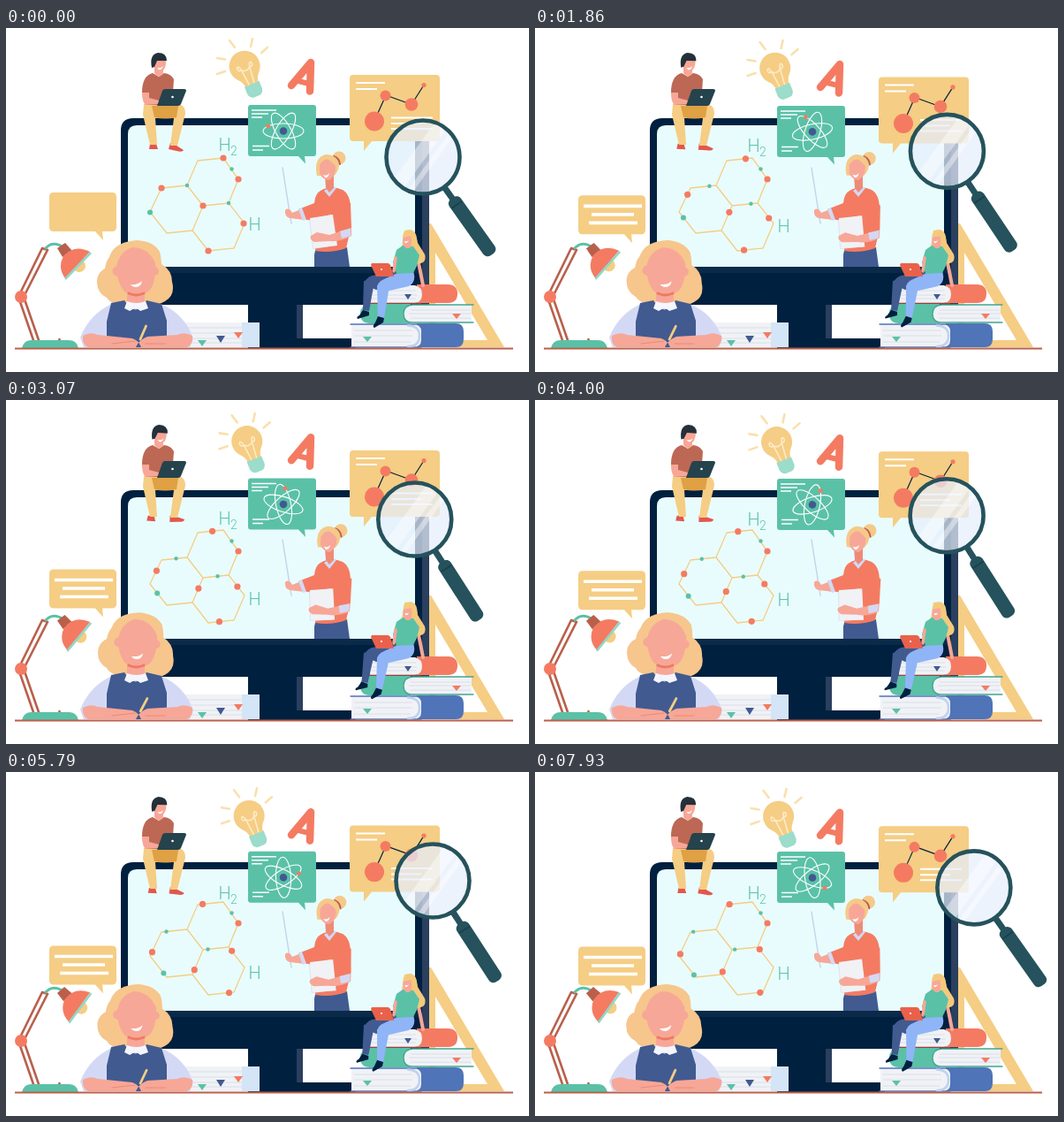
Write an HTML page that moves like this. It is 592 px wide and 389 px high and loops after 8 s.

```html
<!DOCTYPE html>
<html lang="en">
<head>
<meta charset="utf-8">
<title>Online lesson</title>
<style>
  html, body { margin: 0; width: 100%; height: 100%; overflow: hidden; background: #fff; }
  svg { display: block; width: 100%; height: 100%; }
  text { font: 300 20px Roboto, Inter, sans-serif; fill: #5ac1a7; }
  .orange { fill: #f47b62; } .yellow { fill: #f5cd84; } .mint { fill: #5ac1a7; }
  .navy { fill: #00203f; } .blue { fill: #415a90; } .skin { fill: #f7a797; }
  .lilac { fill: #d3d9f5; } .brown { fill: #b9604c; } .white { fill: #fff; }
  .page { fill: #f0f2f6; } .teal { fill: #25525c; }
  .line { fill: none; stroke-linecap: round; stroke-linejoin: round; }
  .rule { fill: none; stroke: #fff; }
  .pageRule { fill: none; stroke: #d9dfe8; stroke-width: 1; }
</style>
</head>
<body>
<svg viewBox="0 0 592 389" preserveAspectRatio="none">
  <defs><clipPath id="lensClip"><circle r="40"/></clipPath></defs>

  <!-- set square and monitor -->
  <path class="yellow" fill-rule="evenodd" d="M479 221H481L564 361H479ZM486 254V353H545Z"/>
  <path fill="#2b3f5e" d="M455 102H466Q479 102 479 115V313H455ZM325 313H336V352H325Z"/>
  <path class="navy" d="M144 102H458Q471 102 471 115V313H144Q130 313 130 299V116Q130 102 144 102ZM274 313H329V351H396V362H274Z"/>
  <path fill="#e8fcfd" d="M148 110H454Q463 110 463 119V270H138V120Q138 110 148 110Z"/>
  <path fill="#0b2a49" d="M138 270H463L471 277H130Z"/>

  <!-- molecule -->
  <path class="line" stroke="#f5cd84" stroke-width="1.3" d="M205 178L217 150 246 147 263 171 252 198 223 201ZL176 181 163 208 182 232 211 229 223 201M252 198L270 221 258 249 229 252 211 229"/>
  <g id="atoms"></g>
  <g id="labels"><text x="240.500" y="138.500">H</text><text x="254" y="143.500" style="font-size:14px">2</text><text x="274.500" y="229">H</text></g>

  <!-- teacher -->
  <g>
    <path class="line" stroke="#c9d2ea" stroke-width="1.500" d="M313 158L323 221"/>
    <path class="blue" d="M351 248H386L389 270H349V256Z"/>
    <path class="orange" d="M356 184Q368 177 381 183Q390 188 390 205L389 232 385 249Q368 255 350 252L352 219 336 216 331 205 349 198Q350 187 356 184Z"/>
    <path class="skin" d="M334 205L324 209Q320 202 316 206Q315 213 321 215L338 217Z"/>
    <path class="lilac" d="M331 205L335 203 340 217 336 218ZM360 184L366 191 374 181 369 178Z"/>
    <path fill="#ee8b77" d="M361 167H371V181L366 186 362 181Z"/>
    <g id="teacherHead">
      <circle cx="377" cy="147" r="7.500" fill="#f5c98a"/>
      <path class="line" stroke="#b9604c" stroke-width="2" d="M371 145Q377 147 378 154"/>
      <path fill="#f5c98a" d="M351 161Q350 146 362 143Q375 143 377 155Q376 164 370 168L352 167Z"/>
      <path class="skin" d="M355 155Q360 147 365 149Q370 152 373 156Q374 167 366 172Q358 172 355 164Z"/>
      <path class="white" d="M359 166Q363 168 366 164Q365 170 361 169Z"/>
    </g>
    <g id="papers">
      <path fill="#dfe5ef" d="M343 217L368 211 373 246 347 250Z"/>
      <path class="page" d="M344 215L370 211 375 246 348 249Z"/>
      <path class="skin" d="M391 226V235Q380 242 366 241L349 242Q343 239 345 235L352 231 366 234Z"/>
      <path class="lilac" d="M378 229L390 225V235L380 238Z"/>
      <path class="orange" d="M377 194L390 198 391 226 377 230Z"/>
    </g>
  </g>

  <!-- bubbles -->
  <g id="notes">
    <path class="yellow" d="M54 186H120Q125 186 125 191V225Q125 230 120 230H109L110 240 101 230H54Q49 230 49 225V191Q49 186 54 186Z"/>
    <g class="rule" stroke-width="3.600" id="noteLines"></g>
  </g>
  <g id="atomCard">
    <path class="mint" d="M277 87H348Q351 87 351 90V142Q351 145 348 145H338L339 153.500 331 145H277Q274 145 274 142V90Q274 87 277 87Z"/>
    <path class="rule" stroke-width="1.500" d="M278 93H306M278 97H297M278 101H290M279 133.500H298M279 138H291"/>
    <g id="atom">
      <g class="rule" stroke-width="1.100">
        <ellipse rx="23" ry="8.500"/><ellipse rx="23" ry="8.500" transform="rotate(60)"/><ellipse rx="23" ry="8.500" transform="rotate(120)"/>
      </g>
      <circle r="4.300" class="blue"/><circle cx="-17.300" cy="-5.600" r="2.400" class="orange"/>
    </g>
  </g>
  <g id="chart">
    <path class="yellow" d="M393 53H487Q491 53 491 57V124Q491 128 487 128H414L405 139V128H393Q389 128 389 124V57Q389 53 393 53Z"/>
    <path class="rule" stroke-width="2" d="M396 62H429M396 69H420M436 101.500H483M436 108H470M436 114H483"/>
    <path class="line" stroke="#00203f" stroke-width="1.200" d="M417 105L430 76 459 86.500 473 64.500"/>
    <g class="orange"><circle cx="417" cy="105.500" r="11"/><circle cx="429.500" cy="76.500" r="6"/><circle cx="459" cy="86.500" r="7.300"/><circle cx="473" cy="64.500" r="2.600"/></g>
  </g>

  <!-- bulb and letter -->
  <g id="bulb">
    <path class="line" stroke="#fae0ae" stroke-width="2.600" d="M253 14L259 22M279 12L277 21M296 22L289 28M239 34L248 35.500M239 52L248 49"/>
    <g transform="translate(270 43) rotate(-22)">
      <path class="yellow" d="M-8 23Q-8 17 -13 12A17.500 17.500 0 1 1 13 12Q8 17 8 23Z"/>
      <path class="line" stroke="#fdebc8" stroke-width="1.600" d="M-3 22L-5 3Q-9 4 -9 0Q-7 -5 -5 3Q0 8 5 3Q7 -5 9 0Q9 4 5 3L3 22"/>
      <path fill="#9bdccb" d="M-9 22H9V31Q8 36 4 37H-4Q-8 36 -9 31Z"/>
    </g>
  </g>
  <g id="letter" class="line" stroke="#f47b62">
    <path stroke-width="8.500" d="M323 65L345 39 344 71.500"/><path stroke-width="6" d="M331 60L343 63"/>
  </g>

  <!-- student with the laptop -->
  <g>
    <g id="boyFootL"><path fill="#e2574c" d="M163 131H170L172 137H162Z"/></g>
    <g id="boyFootR"><path fill="#e2574c" d="M186 130L193 133 201 138Q200 141 193 139L184 137Z"/></g>
    <path class="yellow" d="M156 86H193Q203 86 203 97L194 133H186L190 102H169L171 132H163L155 98Z"/>
    <path fill="#e0a044" d="M165 88H195L193 101Q180 104 168 101Z"/>
    <path class="brown" fill-opacity=".95" d="M166 51Q154 54 154 73L158 87H188L190 58Q187 52 179 51L173 55Z"/>
    <path class="skin" d="M154 73H162V79L173 82V86L158 87Q154 84 154 73ZM168 44H178V51Q174 58 168 51Z"/>
    <g id="boyHead">
      <path class="skin" d="M167 35H181Q182 48 174 50Q168 49 167 42Z"/>
      <path fill="#24303a" d="M165 45Q162 30 172 28Q182 28 182 37L171 37 168 44Z"/>
      <path class="white" d="M171 45Q175 46 178 43Q176 48 173 47Z"/>
    </g>
    <path fill="#24434d" d="M180 69H202Q204 69 204 71L198 86Q197 88 195 88H171L177 71Q178 69 180 69Z"/>
    <circle cx="188.500" cy="78" r="1.300" class="white"/>
  </g>

  <!-- lamp -->
  <path class="line" stroke="#b9604c" stroke-width="2.600" d="M14 304L31 353M20 304L37 353M14 304L41 249M20 304L47 251M41 249L47 251M60.500 352V354"/>
  <circle cx="17" cy="304" r="7" class="orange"/>
  <path class="mint" d="M18 362Q20 353 29 353H71Q80 353 82 362Z"/>
  <path class="line" stroke="#5ac1a7" stroke-width="3" d="M45 249Q53 240 65 248"/>
  <g id="lampHead">
    <circle cx="83" cy="269" r="7" class="yellow"/>
    <path class="brown" d="M58 249L67 243 75 252 64 259Z"/>
    <path class="orange" d="M95 253L67 283Q58 271 65 258Q77 244 95 253Z"/>
    <path stroke="#8fd8c6" stroke-width="2.600" d="M96 254L67 284"/>
  </g>

  <!-- books beside the stand -->
  <path class="page" d="M200 333H270V361H200Z"/>
  <path class="pageRule" d="M202 339H268M202 345H268M202 351H268M202 356H268"/>
  <path fill="#d3e5f6" d="M267 333H287V361H267Z"/>
  <path class="mint" d="M217 353H227L222 360Z"/><path class="blue" d="M238 348H248L243 356Z"/><path class="orange" d="M258 344H268L263 351Z"/>

  <!-- writing pupil -->
  <g>
    <g id="girlHead">
      <path fill="#f6c68c" d="M148 240Q167 241 174 253Q176 260 176 267Q188 274 188 287Q192 302 180 309Q166 317 152 312H138Q119 314 114 305Q102 299 103 285Q104 276 112 272Q113 264 117 259Q122 242 148 240Z"/>
      <g class="skin"><circle cx="126" cy="275" r="5.500"/><circle cx="168" cy="275" r="5"/><path d="M125 270Q128 253 143 248Q161 248 169 266Q170 290 161 298Q147 306 134 298Q125 287 125 270Z"/></g>
      <path class="white" d="M141 290Q149 291 154 286Q153 293 147 293Q143 293 141 290Z"/>
    </g>
    <path class="skin" d="M137 296Q147 302 157 296V314H137Z"/>
    <path class="line" stroke="#ef7961" stroke-width="3" d="M139 300Q147 304 156 300"/>
    <path class="lilac" d="M120 312Q95 323 84 350L88 361H208L212 351Q202 323 175 312L148 317Z"/>
    <path class="blue" d="M119 311L134 308Q147 329 159 308L176 312 182 331V361H114V332Z"/>
    <path fill="#f4f6fc" d="M137 309Q148 313 158 309L161 317 152 320 147 316 140 320 134 317Z"/>
    <path class="skin" d="M87 348Q96 343 104 347L143 351Q150 353 153 361H93Q86 358 87 348ZM211 348Q202 343 194 347L160 349Q150 353 147 361H205Q212 358 211 348Z"/>
    <path class="line" stroke="#ec8a77" stroke-width="1" d="M120 357L146 354M158 357L180 357"/>
    <g id="pencil"><path class="line" stroke="#f5cd84" stroke-width="2.800" d="M152 352L158.500 337"/></g>
  </g>

  <!-- right book stack -->
  <g>
    <path fill="#4f74b8" d="M465 334H509Q518 334 518 343V352Q518 361 509 361H465Z"/>
    <path class="page" d="M391 335H460Q470 335 470 343V353Q470 361 460 361H391Z"/>
    <path class="line" stroke="#4f74b8" stroke-width="1.300" d="M390 335H470M390 361H470"/>
    <path class="line" stroke="#bfd2ee" stroke-width="2.500" d="M455 336.500Q468 337 468 348Q468 360 455 360"/>
    <path class="pageRule" d="M394 342H460M394 348H460M394 355H458"/>
    <path class="mint" d="M458 312H412Q401 313 401 323Q401 334 412 334H458Z"/>
    <path class="page" d="M527 313H460Q450 314 450 323Q450 332 460 333H527Z"/>
    <path class="line" stroke="#42a78f" stroke-width="1.300" d="M529 313H460Q450 314 450 323Q450 333 460 333H529"/>
    <path class="pageRule" d="M458 319H526M456 323H526M458 328H526"/>
    <path class="orange" d="M465 290H501Q511 291 511 300Q511 311 501 311H465Z"/>
    <path class="page" d="M412 291H463Q471 293 471 301Q471 310 463 311H412Z"/>
    <path class="line" stroke="#f47b62" stroke-width="1.200" d="M411 311H470"/>
    <path class="pageRule" d="M414 297H464M414 302H465M414 306H464"/>
    <path class="blue" d="M451 301H459L455 307Z"/><path class="orange" d="M505 323H515L510 329Z"/><path class="mint" d="M404 349H414L409 355Z"/>
  </g>

  <!-- student on the books -->
  <g>
    <path class="line" stroke="#f7a797" stroke-width="4" d="M465 257Q469 274 472 291"/>
    <path class="blue" d="M451 275L420 279Q407 280 405 290L419 296 458 289Z"/>
    <g id="darkShin"><path class="blue" d="M405 286L417 287 411 320 404 319Z"/><path class="navy" d="M404 319L411 321 411 325 398 329Q396 327 400 325Z"/></g>
    <g id="lightShin"><path fill="#8fb5f7" d="M420 291L434 292 428 328 421 327Z"/><path class="navy" d="M421 326L428 328 427 333 417 339Q414 338 418 333Z"/></g>
    <path fill="#8fb5f7" d="M448 275H461Q465 287 456 292L434 297 421 296Q419 287 428 284Z"/>
    <path fill="#f5c97c" d="M451 229Q464 227 466 243L474 256Q477 266 465 267L448 247Z"/>
    <path class="mint" d="M449 246L461 247 468 257 465 269 461 277 442 278 438 265 442 251Z"/>
    <path class="line" stroke="#f7a797" stroke-width="3.500" d="M441 260L439 275"/>
    <g id="womanHead">
      <path class="skin" d="M450 234Q459 229 460 238L458 248Q454 251 451 247Q448 242 450 234Z"/>
      <path fill="#f5c97c" d="M449 237Q449 228 457 228Q466 229 465 244L460 245 458 235Z"/>
      <path class="white" d="M451 241Q454 242 456 240Q454 244 452 243Z"/>
    </g>
    <path fill="#e9614b" d="M414 266H432Q434 266 435 268L439 281H419L413 268Z"/>
    <circle cx="425" cy="273" r="1.100" class="white"/>
  </g>

  <path stroke="#b9604c" stroke-width="1.800" d="M10 362.500H574"/>

  <!-- magnifier -->
  <g id="magnifier">
    <g id="handle">
      <path class="teal" d="M42 -3.500H62V3.500H42Z"/>
      <rect class="teal" x="57" y="-8" width="78" height="16" rx="6"/>
      <path stroke="#193f49" stroke-width="1.500" d="M66 -7V7"/>
    </g>
    <circle r="41" fill="#e6effc" fill-opacity=".72"/>
    <g clip-path="url(#lensClip)" stroke="#fff" stroke-opacity=".4"><path stroke-width="15" d="M22 -38L-32 36"/><path stroke-width="6" d="M38 -34L-14 38"/></g>
    <circle r="41.500" fill="none" stroke="#25525c" stroke-width="4.600"/>
  </g>
</svg>
<script>
const LOOP = 8000, SWING = 7150;
const $ = id => document.getElementById(id);
const mix = (a, b, k) => a + (b - a) * k;
const clamp = v => Math.max(0, Math.min(1, v));
const triangle = (t, half) => 1 - Math.abs(1 - (t / half) % 2);

function add(parent, tag, attrs) {
  const el = document.createElementNS("http://www.w3.org/2000/svg", tag);
  for (const name in attrs) el.setAttribute(name, attrs[name]);
  return $(parent).appendChild(el);
}

// Each atom slides along one bond: colour, radius, start, end.
const atoms = [
  ["orange", 3.6, 246, 147, 217, 150], ["orange", 3.6, 263, 171, 263, 171],
  ["orange", 3.6, 176, 181, 163, 209], ["orange", 3.6, 223, 201, 211, 229],
  ["orange", 3.6, 269, 221, 252.5, 198], ["orange", 3.6, 229, 252, 258, 249],
  ["mint", 2.2, 255.5, 159.500, 255.5, 159.500], ["mint", 2.2, 205, 178, 176, 181],
  ["mint", 2.2, 252, 198, 223, 201], ["mint", 3, 163, 208.5, 182, 232]
].map(([color, r, ...bond]) => ({ bond, el: add("atoms", "circle", { class: color, r }) }));

const noteLines = [[55, 121, 198], [64, 112, 207.5], [61, 116, 217]]
  .map(([from, to, y]) => ({ from, to, y, el: add("noteLines", "path", {}) }));

// Parts that drift with the slow swing, and parts that turn with the faster one.
const drifts = { notes: [0, 12.9], atomCard: [0, 3.4], chart: [0, 9.4], bulb: [6.2, 7.8], letter: [0, 7.6], labels: [0, 6.5] };
const turns = {
  girlHead: [3.5, 147, 308], teacherHead: [4, 366, 180], papers: [6, 345, 215], boyHead: [4, 172, 52],
  boyFootR: [-16, 189, 132], boyFootL: [5, 166, 100], darkShin: [3, 412, 286],
  lightShin: [4, 430, 292], womanHead: [3, 453, 250], pencil: [5, 152, 355]
};

// Magnifier: time, x, y, handle turn.
const glass = [
  [0, 472, 146, 0], [3500, 461.5, 133.5, 3], [4860, 474, 126, 2.7], [5790, 483, 123, 2.4],
  [6930, 493, 123, 0.8], [7400, 496, 126, 0.3], [8000, 497, 131.5, 0]
];

function sample(keys, t) {
  const i = keys.findIndex(key => key[0] > t), a = keys[i - 1], b = keys[i];
  const k = (t - a[0]) / (b[0] - a[0]);
  return a.map((v, n) => mix(v, b[n], k));
}

const place = (id, transform) => $(id).setAttribute("transform", transform);

function draw(t) {
  const slow = triangle(t, SWING), fast = triangle(t, SWING / 2);
  for (const id in drifts) place(id, `translate(${drifts[id].map(v => v * slow)})`);
  for (const id in turns) {
    const [angle, x, y] = turns[id];
    place(id, `rotate(${angle * fast} ${x} ${y})`);
  }
  place("lampHead", `rotate(${-9 * slow} 66 250)`);
  place("atom", `translate(314 116.5) rotate(${t * 0.0255})`);

  for (const { bond: [x1, y1, x2, y2], el } of atoms) {
    el.setAttribute("cx", mix(x1, x2, slow));
    el.setAttribute("cy", mix(y1, y2, slow));
  }
  noteLines.forEach(({ from, to, y, el }, i) => {
    const shown = clamp((t - 70 - i * 430) / 430);
    el.setAttribute("d", shown ? `M${from} ${y}H${mix(from, to, shown)}` : "");
  });

  const [, x, y, turn] = sample(glass, t);
  place("magnifier", `translate(${x} ${y})`);
  place("handle", `rotate(${54.6 + turn})`);
}

const start = performance.now();
function frame() {
  draw((performance.now() - start) % LOOP);
  requestAnimationFrame(frame);
}
frame();
</script>
</body>
</html>
```
